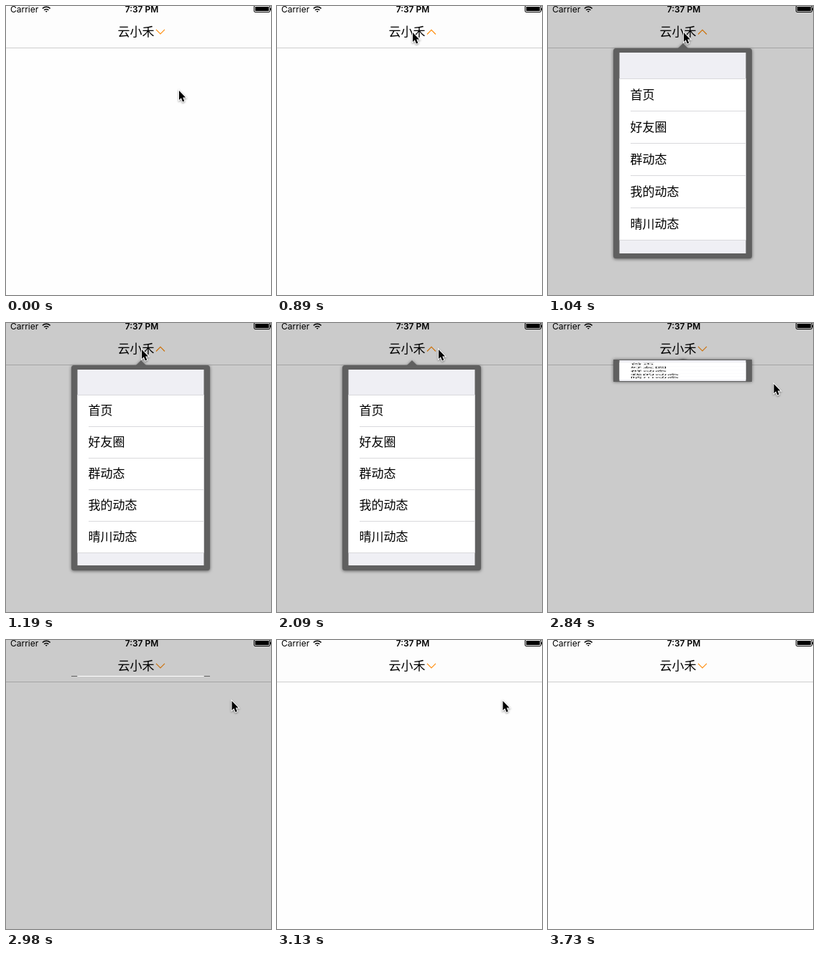
An HTML page with a canvas for the animation above (4.12 s loop, 369x403 px).

```html
<!DOCTYPE html>
<html lang="zh">
<head>
<meta charset="utf-8">
<title>Dropdown menu</title>
<style>
html, body { margin: 0; width: 100%; height: 100%; overflow: hidden; background: #fefefe; }
canvas { display: block; }
</style>
</head>
<body>
<canvas id="stage" width="369" height="403"></canvas>
<script>
const ctx = document.getElementById('stage').getContext('2d');
const WIDTH = 369, HEIGHT = 403;
const LOOP = 4120, STEP = 149; // ms
const CJK = '17px "Noto Sans CJK SC", "Noto Sans CJK", sans-serif';
const ITEMS = ['首页', '好友圈', '群动态', '我的动态', '晴川动态'];
const ROW = 44;
const TOP = 50; // the menu unfolds from this line

// Moments in steps
const TAP = 6, OPEN = 7, WANDER = 14, CLOSE = 19, GONE = 21, LEAVE = 22;

const clamp = u => Math.min(1, Math.max(0, u));
const easeOut = u => 1 - (1 - clamp(u)) ** 2;
const mix = (a, b, u) => a + (b - a) * u;

function pointerAt(step) {
  if (step < WANDER) {
    const u = easeOut(step / 5);
    return [mix(240, 188, u), mix(116, 35, u)];
  }
  const u = easeOut((step - WANDER) / 4);
  const fall = Math.max(0, step - LEAVE);
  return [mix(224, 313.5, u) + 4 * fall, mix(35, 83, u) + 65 * fall ** 2.29];
}

function menuScale(step) {
  if (step < OPEN || step >= GONE) return 0;
  return step < CLOSE
    ? 1 + 0.0237 * 0.02 ** (step - OPEN)
    : 0.108 * 0.02 ** (step - CLOSE);
}

function rect(color, x, y, w, h) {
  ctx.fillStyle = color;
  ctx.fillRect(x, y, w, h);
}

function text(str, x, y, font, align = 'left') {
  ctx.font = font;
  ctx.textAlign = align;
  ctx.fillStyle = '#000';
  ctx.fillText(str, x, y);
}

function trace(points, closed) {
  ctx.beginPath();
  points.forEach(([x, y]) => ctx.lineTo(x, y));
  if (closed) ctx.closePath();
}

function statusBar() {
  text('Carrier', 6, 9, '12px Inter, sans-serif');
  text('7:37 PM', 189, 9, '600 12px Inter, sans-serif', 'center');

  ctx.strokeStyle = '#000';
  ctx.lineWidth = 1.6;
  for (let i = 0; i < 3; i++) {
    ctx.beginPath();
    ctx.arc(56.2, 8.9, 1.2 + 3.2 * i, -Math.PI * 0.75, -Math.PI * 0.25);
    ctx.stroke();
  }

  ctx.lineWidth = 1;
  ctx.beginPath();
  ctx.roundRect(345.5, -0.5, 22, 9, 1.5);
  ctx.stroke();
  rect('#000', 347, 1, 19, 6);
  rect('#000', 368, 3, 1, 3);
}

function page(open) {
  rect('#fefefe', 0, 0, WIDTH, HEIGHT);
  rect('#fdfdfd', 0, 0, WIDTH, 58);
  rect('#cdcdcd', 0, 58, WIDTH, 1);
  statusBar();
  text('云小禾', 155.5, 42, CJK);
  const [side, tip] = open ? [39.5, 33.3] : [32.8, 39];
  trace([[209, side], [215, tip], [221, side]]);
  ctx.strokeStyle = '#ff8c0a';
  ctx.lineWidth = 1.1;
  ctx.stroke();
}

function menu(scale) {
  const flat = scale < 0.05;
  const map = y => Math.round(TOP + (y - TOP) * scale);
  const span = (y1, y2) => Math.max(1, map(y2) - map(y1));
  const band = (color, y1, y2) => rect(color, 99.5, map(y1), 176, span(y1, y2));

  ctx.save();
  ctx.shadowColor = flat ? 'transparent' : 'rgba(0,0,0,.55)';
  ctx.shadowBlur = 4;
  ctx.shadowOffsetY = scale;
  ctx.fillStyle = '#606060';
  ctx.beginPath();
  ctx.roundRect(91, map(59), 193, span(59, 345), 3.5 * clamp(scale));
  ctx.moveTo(181, map(59));
  ctx.lineTo(188, map(52));
  ctx.lineTo(195, map(59));
  ctx.fill();
  ctx.restore();

  band('#efeff4', 65, 338);
  band('#fff', 100, 320);
  if (flat) return;

  for (let i = 0; i <= ITEMS.length; i++) {
    const inset = i % ITEMS.length ? 15.5 : 0;
    rect('#d9d9dc', 99.5 + inset, map(99.5 + ROW * i), 176 - inset, clamp(scale));
  }
  ctx.save();
  ctx.translate(0, TOP);
  ctx.scale(1, scale);
  ITEMS.forEach((item, i) => text(item, 114.5, 78 + ROW * i, CJK));
  ctx.restore();
}

function pointer(x, y) {
  ctx.save();
  ctx.translate(x + 1, y + 2);
  trace([[0, 0], [0, 13], [2.9, 10.3], [5, 15.4], [7.3, 14.4], [5.2, 9.5], [9.1, 9.5]], true);
  ctx.strokeStyle = '#fff';
  ctx.lineWidth = 2;
  ctx.shadowColor = 'rgba(0,0,0,.45)';
  ctx.shadowBlur = 2.5;
  ctx.shadowOffsetY = 1;
  ctx.stroke();
  ctx.shadowColor = 'transparent';
  ctx.fillStyle = '#000';
  ctx.fill();
  ctx.restore();
}

function draw(now) {
  const step = Math.floor((now % LOOP + 5) / STEP);
  const scale = menuScale(step);
  page(step >= TAP && step < CLOSE);
  if (scale) {
    rect('rgba(0,0,0,.2)', 0, 0, WIDTH, HEIGHT);
    menu(scale);
  }
  pointer(...pointerAt(step));
}

const start = performance.now();
function tick() {
  draw(performance.now() - start);
  requestAnimationFrame(tick);
}
tick();
</script>
</body>
</html>
```
